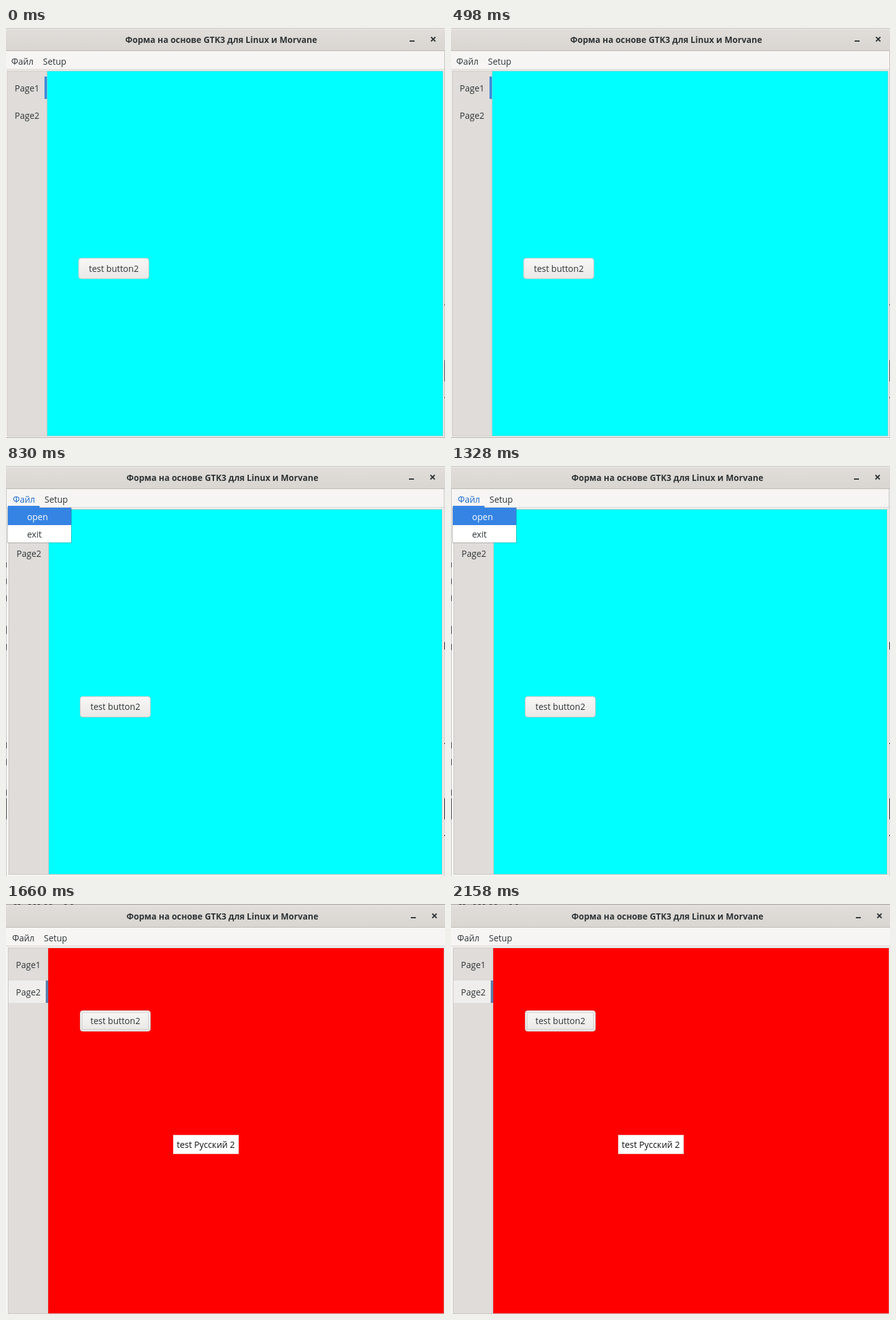
An HTML page with a canvas that plays this animation: 707 by 659 pixels, repeating every 2490 ms.

```html
<!DOCTYPE html>
<html lang="ru">
<head>
<meta charset="utf-8">
<style>
html, body { margin: 0; width: 100%; height: 100%; overflow: hidden; }
canvas { display: block; }
</style>
</head>
<body>
<canvas id="stage" width="707" height="659"></canvas>
<script>
const ctx = document.getElementById('stage').getContext('2d');
const SCENE_MS = 830;
const INK = '#2e3436', BORDER = '#cdc7c2';

function rect(x, y, w, h, color) {
  ctx.fillStyle = color;
  ctx.fillRect(x, y, w, h);
}

function text(str, x, y, color = INK, font = '14px') {
  ctx.font = `${font} "Open Sans", "Noto Sans", sans-serif`;
  ctx.fillStyle = color;
  ctx.fillText(str, x, y);
}

function shade(y, h, top, bottom) {
  const g = ctx.createLinearGradient(0, y, 0, y + h);
  g.addColorStop(0, top);
  g.addColorStop(1, bottom);
  return g;
}

function button(x, y, focused) {
  ctx.beginPath();
  ctx.roundRect(x + .5, y + .5, 113, 33, 4);
  ctx.fillStyle = shade(y, 34, '#f8f7f6', '#eae8e6');
  ctx.fill();
  ctx.strokeStyle = BORDER;
  ctx.stroke();
  if (focused) {
    ctx.setLineDash([1, 1]);
    ctx.strokeStyle = '#aaa8a6';
    ctx.strokeRect(x + 3.5, y + 3.5, 107, 27);
    ctx.setLineDash([]);
  }
  text('test button2', x + 17, y + 22);
}

function titleBar(y, titleX, closeX) {
  rect(0, y, 707, 36, shade(y, 36, '#e1dedb', '#d9d5d0'));
  rect(0, y, 707, 1, '#c5c1bc');
  rect(0, y + 1, 707, 1, '#efedeb');
  rect(0, y + 36, 707, 1, '#bfb8b1');
  text('Форма на основе GTK3 для Linux и Morvane', titleX, y + 24, INK, 'bold 13.65px');
  rect(closeX - 38, y + 20, 8, 2, INK);
  ctx.strokeStyle = INK;
  ctx.lineWidth = 2;
  ctx.beginPath();
  for (const s of [-1, 1]) {
    ctx.moveTo(closeX - 3.5, y + 18 - 3.5 * s);
    ctx.lineTo(closeX + 3.5, y + 18 + 3.5 * s);
  }
  ctx.stroke();
  ctx.lineWidth = 1;
}

// x, y: shift of the contents; right, bottom: page limits
function windowFrame({ x, y, right, bottom, color, titleX, closeX, menuOpen }) {
  rect(0, 0, 707, 659, '#f6f5f4');
  titleBar(Math.ceil(y), titleX, closeX);
  text('Файл', x + 8, y + 59, menuOpen ? '#1b6acb' : INK);
  text('Setup', x + 59, y + 59);
  rect(0, Math.ceil(y) + 66, 707, 1, '#d5d0cc');
  rect(x + 1, y + 69, right - x, bottom - y - 68, BORDER);
  rect(x + 2, y + 70, 63, bottom - y - 70, '#dfdcd9');
  rect(x + 66, y + 70, right - x - 66, bottom - y - 70, color);
}

const edgeMarks = (x, spans) =>
  spans.forEach(([y, h]) => rect(x, y, 1, h, '#30343c'));

const scenes = [
  () => {
    windowFrame({ x: .5, y: -.5, right: 703.5, bottom: 655.5, color: '#0ff', titleX: 192, closeX: 688 });
    rect(62, 78, 4, 36, '#3d8bd8');
    text('Page1', 14, 102);
    text('Page2', 14, 146);
    button(116.5, 369.5);
    rect(0, 658, 707, 1, '#aaa8a6');
    rect(706, 37, 1, 622, '#bdb9b5');
    edgeMarks(706, [[444, 2], [534, 34], [593, 2]]);
  },
  () => {
    windowFrame({ x: 3, y: 0, right: 702, bottom: 656, color: '#0ff', titleX: 194, closeX: 687, menuOpen: true });
    text('Page2', 17, 146);
    button(119, 370);
    rect(3, 64, 51, 3, '#3584e4');
    rect(2, 67, 104, 57, 'rgba(0, 0, 0, .23)');
    rect(3, 67, 102, 28, '#3584e4');
    rect(3, 95, 102, 28, '#fff');
    text('open', 34, 87, '#fff');
    text('exit', 34, 115);
    rect(0, 37, 1, 622, '#c4c2c0');
    rect(705, 37, 1, 622, '#c4c2c0');
    edgeMarks(0, [[155, 8], [181, 9], [208, 9], [257, 13], [286, 10], [444, 10], [471, 10], [520, 10], [534, 34]]);
    edgeMarks(706, [[283, 12], [445, 2], [534, 34], [593, 2]]);
  },
  () => {
    windowFrame({ x: 2, y: 1, right: 705, bottom: 658, color: '#f00', titleX: 194, closeX: 690 });
    rect(0, 0, 707, 1, '#b4b2af');
    for (const x of [13, 19, 36, 44, 51, 62, 70, 94, 104]) rect(x, 0, 4, 1, INK);
    rect(4, 123, 60, 36, '#efeeec');
    rect(64, 123, 4, 36, '#5b7fae');
    text('Page1', 16, 103);
    text('Page2', 16, 147);
    button(119, 171, true);
    rect(269, 371, 106, 31, '#e8c5c3');
    rect(270, 372, 104, 29, '#fff');
    text('test Русский 2', 275, 392, '#111');
  }
];

function draw(now) {
  scenes[Math.floor(now / SCENE_MS) % scenes.length]();
  requestAnimationFrame(draw);
}
draw(performance.now());
</script>
</body>
</html>
```
